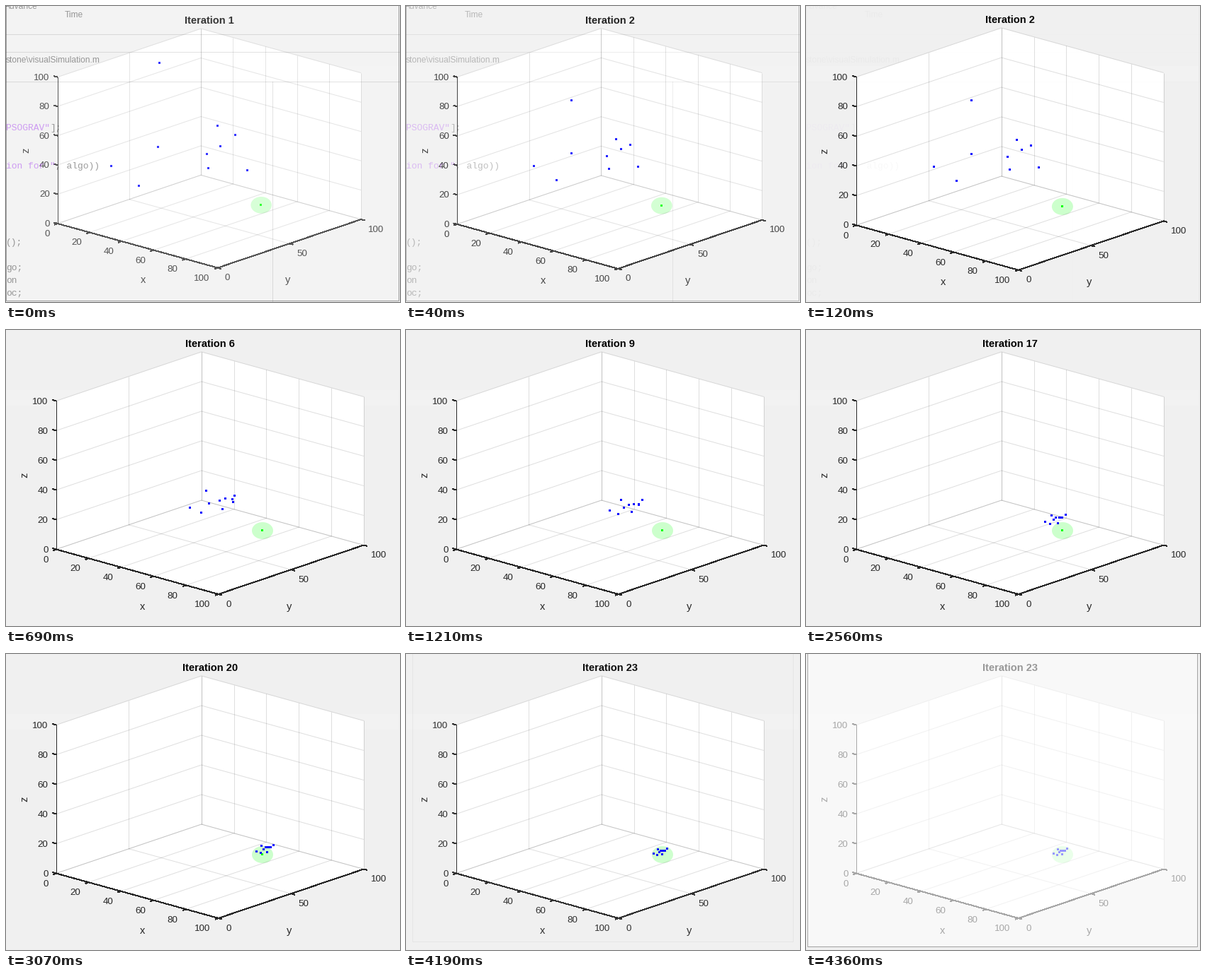
Write a matplotlib script that moves like this. It is 556x419 px and loops after 4420 ms.

```python
import numpy as np
import matplotlib.pyplot as plt
from matplotlib.animation import FuncAnimation
from matplotlib.collections import LineCollection
from matplotlib.patches import Ellipse, Polygon, Rectangle

W, H, DPI = 556, 419, 72
LOOP, STEP = 4420, 10
INK = (0.15, 0.15, 0.15)
PURPLE = (0.63, 0.2, 0.95)
LAST = 24  # final swarm state; the title stops one earlier

# Particles on the stage: first scatter and final formation
START = np.array([(216, 80), (147, 227), (187, 256), (214, 200), (284, 210),
                  (286, 231), (299, 170), (303, 199), (324, 183), (342, 234)])
REST = np.array([(355, 276), (349, 282), (354, 284), (357, 280), (359, 278),
                 (361, 283), (362, 278), (368, 275), (365, 278), (364, 278)])
# Path of the swarm's centre: state, x, y
PATH = np.array([(1, 260, 199), (6, 298, 243), (13, 335, 257),
                 (20, 366, 275), (22, 368, 278), (24, 359.4, 279.2)])


def swarm(n):
    """Scatter decays into a slowly tightening formation around the centre."""
    centre = [np.interp(n, PATH[:, 0], PATH[:, k]) for k in (1, 2)]
    w = np.array([0.7, 0.6]) ** (n - 1)
    widen = 1 + (LAST - n) / 14
    spread = (w * (START - START.mean(axis=0))
              + (1 - w) * widen * (REST - REST.mean(axis=0)))
    return np.round(centre + spread)


def state(t):
    return min((t - 180) // 170 + 3, LAST)


def opening(t):
    """1 to 0 in short steps while the window appears."""
    return max(0, 1 - (t + 10) // 30 / 6) ** 2.5


def closing(t):
    """0 to 1 in four steps while the window fades away."""
    return max(0, (t - 4132) // 57 / 4) ** 1.8


def project(x, y, z):
    """Orthographic view of the 0..100 cube, in pixels."""
    return (70.8 + 2.29 * x + 2.05 * y,
            310.5 + 0.635 * x - 0.695 * y - 2.1 * z)


plt.rcParams["font.family"] = "Liberation Sans"
fig = plt.figure(figsize=((W + 1e-6) / DPI, (H + 1e-6) / DPI), dpi=DPI,
                 facecolor=(240 / 255,) * 3)


def layer():
    ax = fig.add_axes([0, 0, 1, 1])
    ax.set(xlim=(0, W), ylim=(H, 0))
    ax.axis("off")
    return ax


back, ax, front = layer(), layer(), layer()
back.add_patch(Rectangle((1, 85), 553, 22, fc=(242 / 255,) * 3, lw=0))


def draw_box():
    outline = [(0, 0, 0), (0, 0, 100), (0, 100, 100),
               (100, 100, 100), (100, 100, 0), (100, 0, 0)]
    ax.add_patch(Polygon([project(*c) for c in outline], fc="white", lw=0))

    grid = []

    def line(a, b):
        grid.append([project(*a), project(*b)])

    for v in range(0, 101, 20):
        line((0, 0, v), (0, 100, v))
        line((0, 100, v), (100, 100, v))
        line((v, 100, 0), (v, 100, 100))
        line((v, 0, 0), (v, 100, 0))
    for v in (0, 50, 100):
        line((0, v, 0), (0, v, 100))
        line((0, v, 0), (100, v, 0))
    ax.add_collection(LineCollection(grid, colors=[INK + (0.15,)],
                                     linewidths=1))


def draw_axes():
    lines = [[project(0, 0, 100), project(0, 0, 0)],
             [project(0, 0, 0), project(100, 0, 0)],
             [project(100, 0, 0), project(100, 100, 0)]]

    def tick(at, step, label, shift, ha):
        x, y = project(*at)
        lines.append([(x, y), (x + step[0], y + step[1])])
        ax.text(x + shift[0], y + shift[1] + 4.7, label, size=13.33,
                color=INK, ha=ha, va="baseline")

    for v in range(0, 101, 20):
        tick((0, 0, v), (-5, -1.4), v, (-11.3, -0.7), "right")
        tick((v, 0, 0), (-4.5, 1.6), v, (-11.3, 13.5), "right")
    for v in (0, 50, 100):
        tick((100, v, 0), (5, 1.4), v, (10.3, 13), "left")
    ax.add_collection(LineCollection(lines, colors=[INK], linewidths=1,
                                     antialiaseds=[False]))

    for name, x, y, angle in (("x", 193, 395.6, 0), ("y", 399.5, 395.6, 0),
                              ("z", 30, 205.5, 90)):
        ax.text(x, y, name, size=14.67, color=INK, rotation=angle,
                rotation_mode="anchor", ha="center", va="baseline")


draw_box()
draw_axes()
ax.add_patch(Ellipse((362, 284), 30, 24, fc=(0, 1, 0, 0.2), lw=0))
dot = dict(ls="", marker="s", ms=3, mew=0)
ax.plot([361], [283], color=(0, 1, 0), **dot)
dots, = ax.plot([], [], color=(0, 0, 1), **dot)
title = ax.text(288.2, 24, "", size=14.67, weight="bold", ha="center",
                va="baseline", color="black")

veil = front.add_patch(Rectangle((0, 0), 1, 1, fc="white", lw=0))
rim = front.add_patch(Rectangle((0, 0), 1, 1, fill=False, lw=1, ec="black"))

# Editor showing through while the window opens: (artist, strength)
ghosts = []


def ghost_text(x, y, s, color=INK, font="Liberation Mono", size=13):
    ghosts.append((front.text(x, y, s, size=size, color=color, family=font,
                              va="baseline"), 0.45))


def ghost_line(xs, ys):
    ghosts.append((front.plot(xs, ys, color=INK, lw=1)[0], 0.13))


for x, y, s in ((-2, 4, "Advance"), (83, 16, "Time"),
                (0, 80, "stone\\visualSimulation.m")):
    ghost_text(x, y, s, font="Liberation Sans", size=12)
ghost_text(0, 176, 'PSOGRAV"', PURPLE)
ghost_text(62.4, 176, "];")
ghost_text(0, 230, 'ion for "', PURPLE)
ghost_text(70.2, 230, ", algo))")
ghost_text(0, 338, "();")
for row, s in enumerate(("go;", "on", "oc;")):
    ghost_text(0, 374 + 18 * row, s)
for y in (40, 65, 107):
    ghost_line((0, 555), (y, y))
ghost_line((376, 376), (107, H))


def set_window(left, right, bottom, white, edge):
    for r in (veil, rim):
        r.set_bounds(left, -5, right - left, bottom + 5)
    veil.set_alpha(white)
    rim.set_alpha(edge)


def draw(i):
    t = i * STEP
    n = state(t)
    dots.set_data(*swarm(n).T)
    title.set_text(f"Iteration {min(n, LAST - 1)}")

    g, c = opening(t), closing(t)
    s = 1 - 0.013 * g
    ax.set_xlim((0 - 2.9 * g) / s, (W - 2.9 * g) / s)
    ax.set_ylim((H - 1.5 * g) / s, (0 - 1.5 * g) / s)
    for art, strength in ghosts:
        art.set_alpha(strength * g)
        art.set_visible(g > 0)

    if c:
        set_window(9.3 - 7 * c, 545.3 + 7 * c, 406.3 + 8 * c,
                   0.6 * c, 0.02 + 0.3 * c)
    else:
        set_window(0.3, 554.3, 417.3, 0.22 * g, 0.35 * g)
    return []


anim = FuncAnimation(fig, draw, frames=LOOP // STEP, interval=STEP,
                     repeat=True, repeat_delay=0, blit=False)
plt.show()
```
